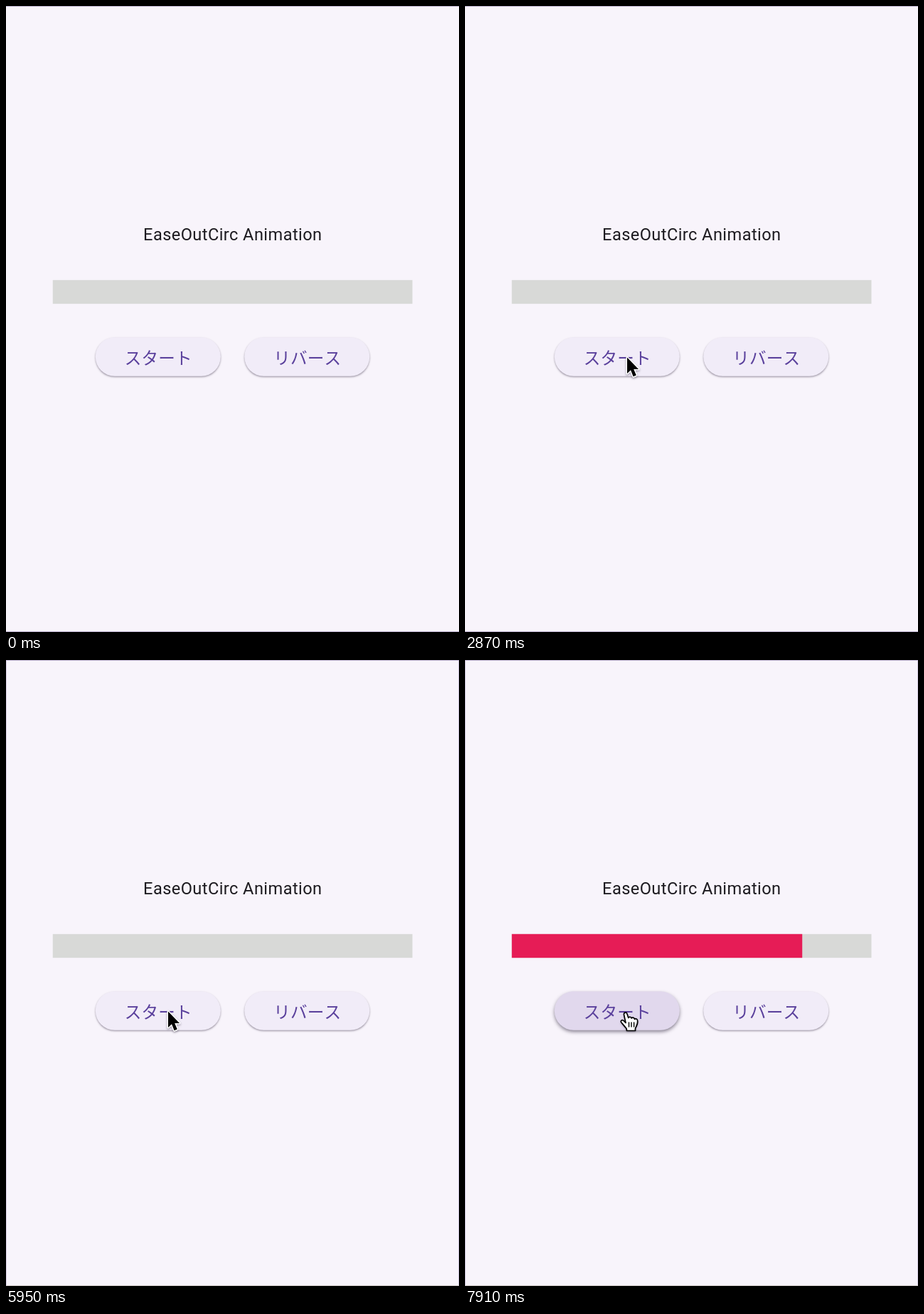
Animation, 637 px wide and 879 px high, one loop 8000 ms. Source, as an HTML page with a canvas:

```html
<!DOCTYPE html>
<html lang="ja">
<head>
<meta charset="utf-8">
<title>EaseOutCirc Animation</title>
<style>
  html, body { margin: 0; width: 100%; height: 100%; overflow: hidden; background: #f8f4fb; }
  canvas { display: block; width: 637px; height: 879px; }
</style>
</head>
<body>
<canvas id="stage" width="637" height="879"></canvas>
<script>
const ctx = document.getElementById('stage').getContext('2d');
const W = 637, H = 879, LOOP = 8000;
const STEP = 43.2;          // real time covered by one step, ms
const HOVER = 135, RELEASE = 143.1, FOCUS = 72;
const BAR = { x: 65.8, y: 384.8, w: 505.7, h: 33.4 };
const BTN = { y: 465.3, w: 176, h: 54.4 };

const clamp = v => Math.min(1, Math.max(0, v));
const lerp = (a, b, p) => a + (b - a) * p;
const smooth = p => p * p * (3 - 2 * p);

function stepAt(t) {
  const n = Math.floor((t - 70) / 140), r = t - 70 - n * 140;
  return n * 3 + (r < 100 ? 0 : r < 120 ? 1 : 2);
}

const bezier = (a, b, s) => 3 * (1 - s) ** 2 * s * a + 3 * (1 - s) * s * s * b + s ** 3;

// cubic-bezier(0.075, 0.82, 0.165, 1)
function easeOutCirc(x) {
  let lo = 0, hi = 1;
  for (let i = 0; i < 24; i++) {
    const mid = (lo + hi) / 2;
    if (bezier(0.075, 0.165, mid) < x) lo = mid; else hi = mid;
  }
  return bezier(0.82, 1, lo);
}

// step, x, y of the pointer tip
const PATH = [[29, -16, 540], [33, 103, 552], [38, 178, 532], [45, 220.5, 501], [51, 228, 493]];

function pointerAt(step) {
  if (step < PATH[0][0]) return null;
  for (let i = 1; i < PATH.length; i++) {
    const [s0, x0, y0] = PATH[i - 1], [s1, x1, y1] = PATH[i];
    if (step <= s1) {
      const p = (step - s0) / (s1 - s0);
      return [lerp(x0, x1, p), lerp(y0, y1, p)];
    }
  }
  return PATH[PATH.length - 1].slice(1);
}

const ARROW = new Path2D('M0 0.5 V23 L5 18.3 L8.6 27.3 L12.8 25.5 L9.2 16.9 H16 Z');
const HAND = new Path2D('M-0.5 27.5 L-1 24.5 C-4 21 -6 18.5 -8.5 15.5 C-9.5 13.5 -7.5 12 -5.5 13 L-2 16.5 ' +
  'L-4.5 5 C-5 2 -1 0.5 0 4 L1.8 9.5 C3 7.5 5.5 8 6 10 C7 8.3 10 9 10.5 11.3 ' +
  'C12 10 14.7 11 14.7 14 C15.2 18 13 21 11.5 24.5 V27.5 Z');
const FINGERS = new Path2D('M2.5 16 V22 M6 16 V22 M9.6 16 V22');

function shadow(alpha, blur, dy) {
  ctx.shadowColor = `rgba(30,20,45,${alpha})`;
  ctx.shadowBlur = blur;
  ctx.shadowOffsetY = dy;
}

function drawPointer(step) {
  const pos = pointerAt(step);
  if (!pos) return;
  ctx.save();
  ctx.translate(...pos);
  ctx.lineJoin = ctx.lineCap = 'round';
  shadow(0.4, 3, 1.5);
  if (step < HOVER) {
    ctx.lineWidth = 3;
    ctx.strokeStyle = '#fff';
    ctx.stroke(ARROW);
    shadow(0, 0, 0);
    ctx.fillStyle = '#000';
    ctx.fill(ARROW);
  } else {
    ctx.fillStyle = '#fff';
    ctx.fill(HAND);
    shadow(0, 0, 0);
    ctx.lineWidth = 1.7;
    ctx.strokeStyle = '#000';
    ctx.stroke(HAND);
    ctx.lineWidth = 1.4;
    ctx.stroke(FINGERS);
  }
  ctx.restore();
}

function label(text, x, y, font, color, spacing) {
  ctx.font = font;
  ctx.letterSpacing = spacing + 'px';
  ctx.textAlign = 'center';
  ctx.fillStyle = color;
  ctx.fillText(text, x, y);
}

function drawButton(x, text, hover, lift, ripple) {
  const pill = new Path2D();
  pill.roundRect(x, BTN.y, BTN.w, BTN.h, BTN.h / 2);
  ctx.save();
  shadow(lerp(0.42, 0.5, lift), lerp(2.5, 5.5, lift), lerp(1.4, 2.6, lift));
  ctx.fillStyle = '#f1ecf8';
  ctx.fill(pill);
  shadow(0, 0, 0);
  ctx.fillStyle = `rgba(94,67,150,${0.115 * hover})`;
  ctx.fill(pill);
  if (ripple) {
    ctx.clip(pill);
    ctx.fillStyle = `rgba(94,67,160,${0.1 * ripple.alpha})`;
    ctx.beginPath();
    ctx.arc(ripple.x, BTN.y + BTN.h / 2, ripple.r, 0, 7);
    ctx.fill();
  }
  ctx.restore();
  label(text, x + BTN.w / 2 + 0.4, 502.5, '400 23.6px "Noto Sans CJK JP", "Noto Sans CJK", sans-serif', '#5a409c', 0.17);
}

// ms counts from the moment the button is released
function rippleAt(ms, center) {
  if (ms < -90 || ms > 375) return null;
  const p = smooth(clamp(ms / 225));
  return {
    x: lerp(228, center, p),
    r: lerp(28, 96, p),
    alpha: clamp((ms + 90) / 75) * (1 - clamp((ms - 225) / 150))
  };
}

function drawEdges(focused) {
  ctx.fillStyle = '#b9aecb';
  ctx.fillRect(0, 0, W, 1);
  ctx.fillStyle = focused ? '#c9c2bf' : '#b9aecb';
  ctx.fillRect(0, H - 1, W, 1);
  if (!focused) return;
  ctx.fillStyle = '#d6cde4';
  ctx.fillRect(0, 1, 1, H - 2);
  ctx.fillRect(W - 1, 1, 1, H - 2);
}

function draw(t) {
  const step = stepAt(t);
  const ms = (step - RELEASE) * STEP;
  const hover = clamp((step - HOVER + 1) * STEP / 100);
  const lift = ms < -90 ? hover : clamp(0.5 + ms / 400);

  ctx.fillStyle = '#f8f4fb';
  ctx.fillRect(0, 0, W, H);
  drawEdges(step >= FOCUS);

  label('EaseOutCirc Animation', 318.8, 329, '400 23.6px Roboto, sans-serif', '#1d1b20', 0.42);

  ctx.fillStyle = '#d8d9d7';
  ctx.fillRect(BAR.x, BAR.y, BAR.w, BAR.h);
  if (ms > 0) {
    ctx.fillStyle = '#e61c56';
    ctx.fillRect(BAR.x, BAR.y, BAR.w * easeOutCirc(ms / 5000), BAR.h);
  }

  drawButton(125.8, 'スタート', hover, lift, rippleAt(ms, 213.8));
  drawButton(335.3, 'リバース', 0, 0, null);
  drawPointer(step);
}

const start = performance.now();
function tick() {
  draw((performance.now() - start) % LOOP);
  requestAnimationFrame(tick);
}
tick();
</script>
</body>
</html>
```
